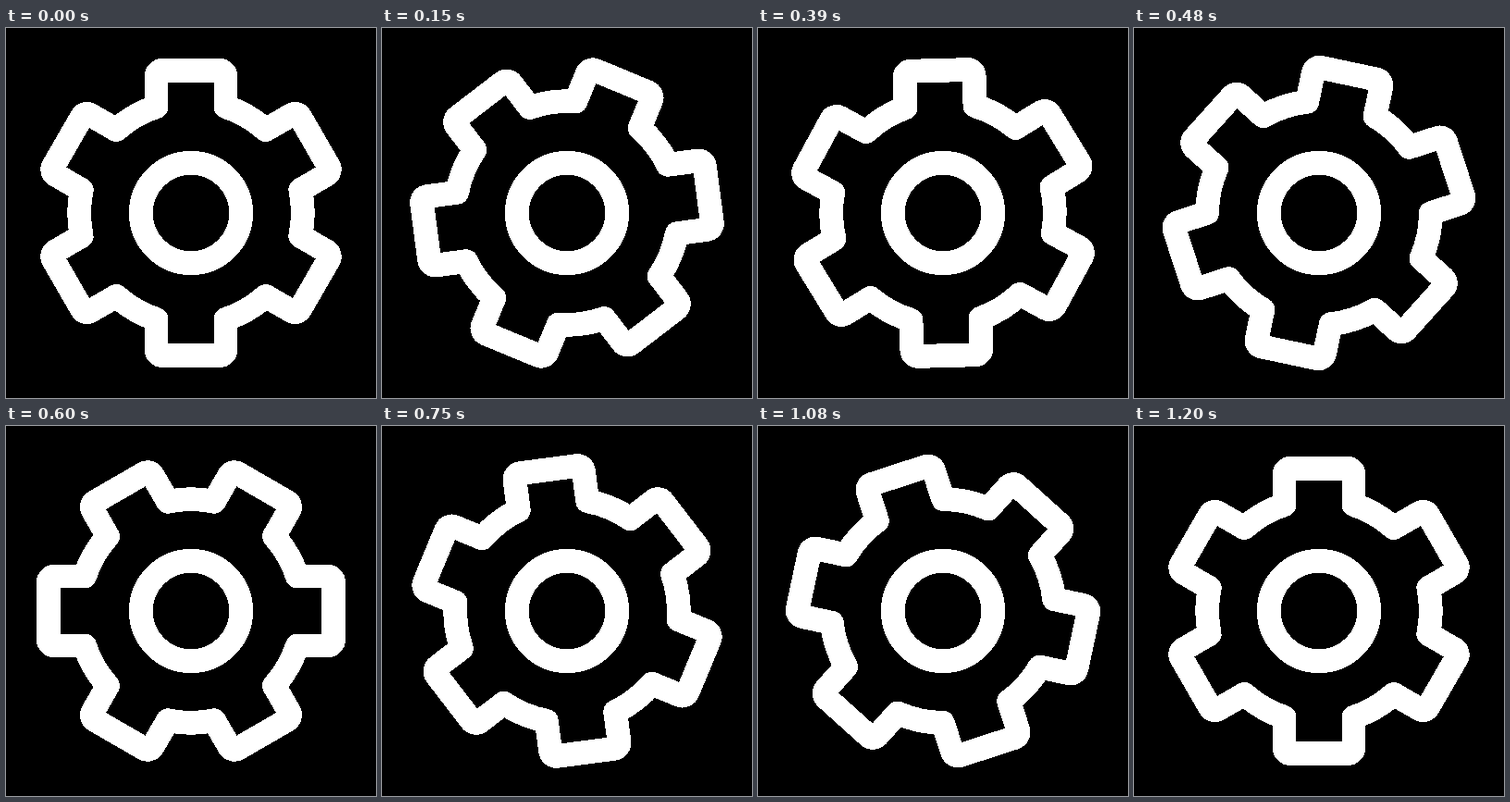
An HTML page that plays this animation: 400x400 px, repeating every 1230 ms.

```html
<!DOCTYPE html>
<html lang="en">
<head>
<meta charset="utf-8">
<title>Gear</title>
<style>
  @property --turn {
    syntax: "<angle>";
    inherits: false;
    initial-value: 0deg;
  }
  html, body {
    margin: 0;
    width: 100%;
    height: 100%;
    overflow: hidden;
    background: #000;
  }
  svg {
    display: block;
    width: 100%;
    height: 100%;
    fill: none;
    stroke: #fff;
    stroke-width: 25.8;
    stroke-linecap: round;
    stroke-linejoin: round;
    shape-rendering: crispEdges;
  }
  /* 41 poses of 30 ms; the small delay keeps samples off the step edges.
     Animating the angle redraws each pose with hard edges. */
  .gear {
    transform-origin: 0 0;
    transform: rotate(var(--turn));
    animation: spin 1230ms steps(41, jump-none) -1ms infinite;
  }
  @keyframes spin {
    from { --turn: 0deg; }
    to { --turn: 180deg; }
  }
</style>
</head>
<body>
<svg viewBox="-200 -200 400 400">
  <defs>
    <!-- one tooth and the rim up to the next tooth -->
    <path id="tooth" d="M-37.5 -114.86V-147.5a6.67 6.67 0 0 1 6.67 -6.67H30.83a6.67 6.67 0 0 1 6.67 6.67V-114.86A120.83 120.83 0 0 1 80.72 -89.91"/>
  </defs>
  <g class="gear">
    <use href="#tooth"/>
    <use href="#tooth" transform="rotate(60)"/>
    <use href="#tooth" transform="rotate(120)"/>
    <use href="#tooth" transform="rotate(180)"/>
    <use href="#tooth" transform="rotate(240)"/>
    <use href="#tooth" transform="rotate(300)"/>
  </g>
  <circle r="54.17"/>
</svg>
</body>
</html>
```
